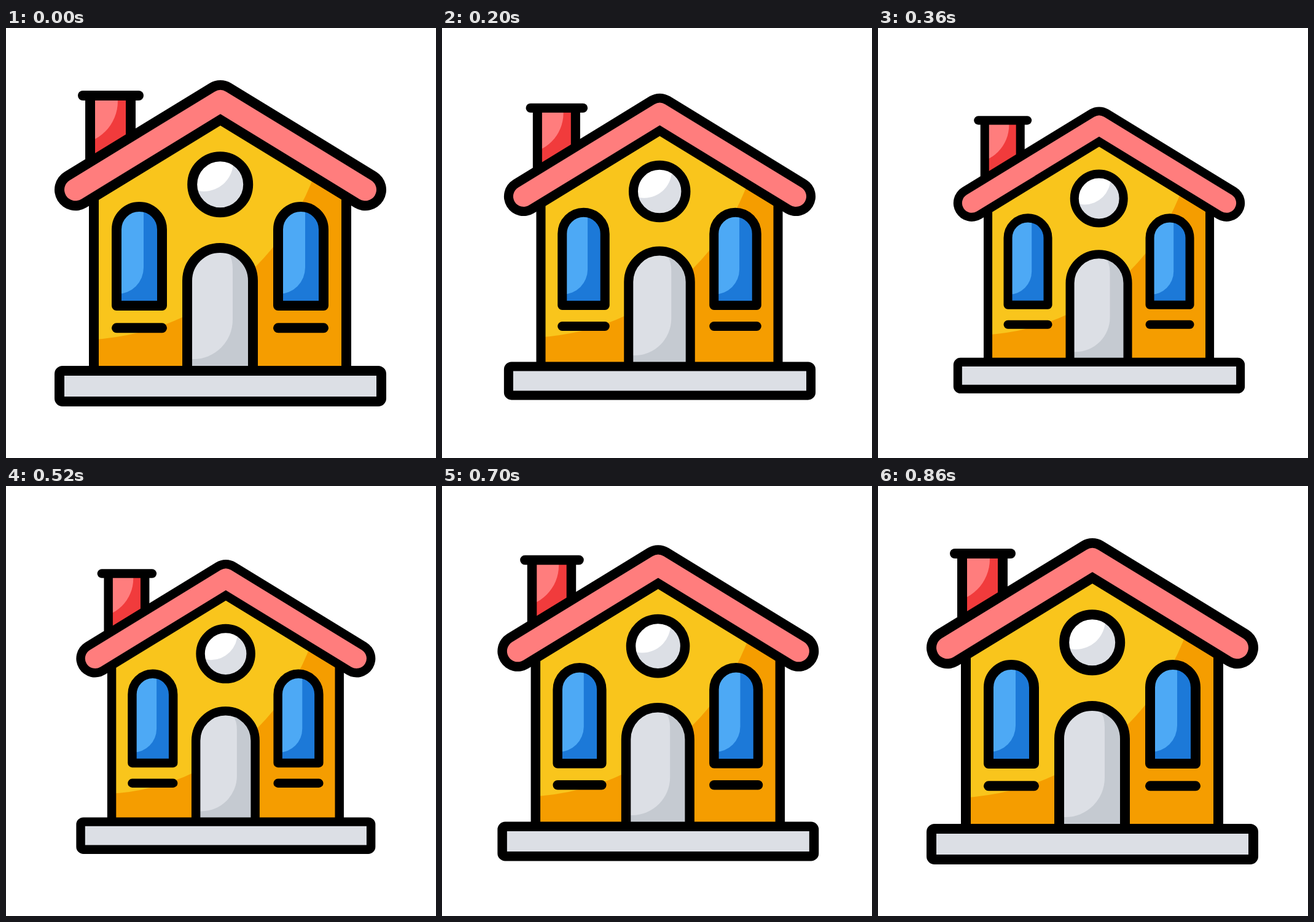
Recreate the animation shown at these times as an HTML page. Size 700 px wide and 700 px high, loop 3 s.

```html
<!DOCTYPE html>
<html lang="en">
<head>
<meta charset="utf-8">
<title>House</title>
<style>
  html, body { margin: 0; width: 100%; height: 100%; overflow: hidden; background: #fff; }
  svg { display: block; width: 100%; height: 100%; }
  .line { fill: none; stroke: #000; stroke-width: 16; stroke-linejoin: round; }
  .cap { stroke-linecap: round; }
</style>
</head>
<body>
<svg viewBox="0 0 700 700">
  <defs>
    <path id="wallShape" d="M143 558V245L349 119L554 245V558Z"/>
    <path id="doorShape" d="M295 558V411.5a53.5 53.5 0 0 1 107 0V558"/>
    <path id="paneShape" d="M180 452V328a37 37 0 0 1 74 0V452Z"/>
    <path id="chimneyShape" d="M137 110V232H203V110Z"/>
    <circle id="roundShape" cx="348.7" cy="254.7" r="45.5"/>
    <clipPath id="wallClip"><use href="#wallShape"/></clipPath>
    <clipPath id="doorClip"><use href="#doorShape"/></clipPath>
    <clipPath id="paneClip"><use href="#paneShape"/></clipPath>
    <clipPath id="chimneyClip"><use href="#chimneyShape"/></clipPath>
    <clipPath id="roundClip"><use href="#roundShape"/></clipPath>
    <g id="sideWindow">
      <use href="#paneShape" fill="#1c79d8"/>
      <path clip-path="url(#paneClip)" fill="#4da9f5" d="M170 280H224V390a43 43 0 0 1 -43 43H170Z"/>
      <use href="#paneShape" class="line"/>
      <path class="line cap" d="M180 488.3H254"/>
    </g>
  </defs>
  <g id="house">
    <use href="#wallShape" fill="#f59d00"/>
    <circle clip-path="url(#wallClip)" cx="117" cy="98" r="410" fill="#f9c51c"/>
    <path class="line" d="M143 558V245M554 558V245"/>

    <use href="#roundShape" fill="#dcdfe5"/>
    <circle clip-path="url(#roundClip)" cx="322" cy="218" r="48" fill="#fff"/>
    <use href="#roundShape" class="line"/>

    <use href="#sideWindow"/>
    <use href="#sideWindow" x="263"/>

    <use href="#doorShape" fill="#c5cad1"/>
    <path clip-path="url(#doorClip)" fill="#dcdfe5" d="M290 350H350L362 366Q369 376 369 392V475a64 64 0 0 1 -64 64H290Z"/>
    <use href="#doorShape" class="line"/>

    <use href="#chimneyShape" fill="#f13b3c"/>
    <circle clip-path="url(#chimneyClip)" cx="112" cy="119" r="70" fill="#ff7d7d"/>
    <path class="line" d="M137 110V232M203 110V200"/>
    <path class="line cap" d="M125 110H216"/>

    <g class="cap" fill="none" stroke-linejoin="round">
      <path d="M113 263.3L349 119L585 263.3" stroke="#000" stroke-width="68"/>
      <path d="M113 263.3L349 119L585 263.3" stroke="#ff7d7d" stroke-width="36"/>
    </g>

    <rect class="line" x="87" y="558" width="524" height="50" rx="5" style="fill:#dcdfe5"/>
  </g>
</svg>
<script>
  const LOOP = 3000, STEP = 20;
  const SHRINK_START = 20, SMALLEST = 383, GROW_END = 857;
  const DEPTH = 0.123;
  const PIVOT = { x: 439.3, y: 442 };
  const house = document.getElementById('house');

  function smooth(from, to, t) {
    const u = Math.min(1, Math.max(0, (t - from) / (to - from)));
    return u * u * (3 - 2 * u);
  }

  function render(ms) {
    const t = Math.floor((ms % LOOP) / STEP) * STEP;
    const press = smooth(SHRINK_START, SMALLEST, t) - smooth(SMALLEST, GROW_END, t);
    const scale = 1 - DEPTH * press;
    const dx = PIVOT.x * (1 - scale), dy = PIVOT.y * (1 - scale);
    house.setAttribute('transform', `translate(${dx} ${dy}) scale(${scale})`);
  }

  const start = performance.now();
  function tick() {
    render(performance.now() - start);
    requestAnimationFrame(tick);
  }
  tick();
</script>
</body>
</html>
```
